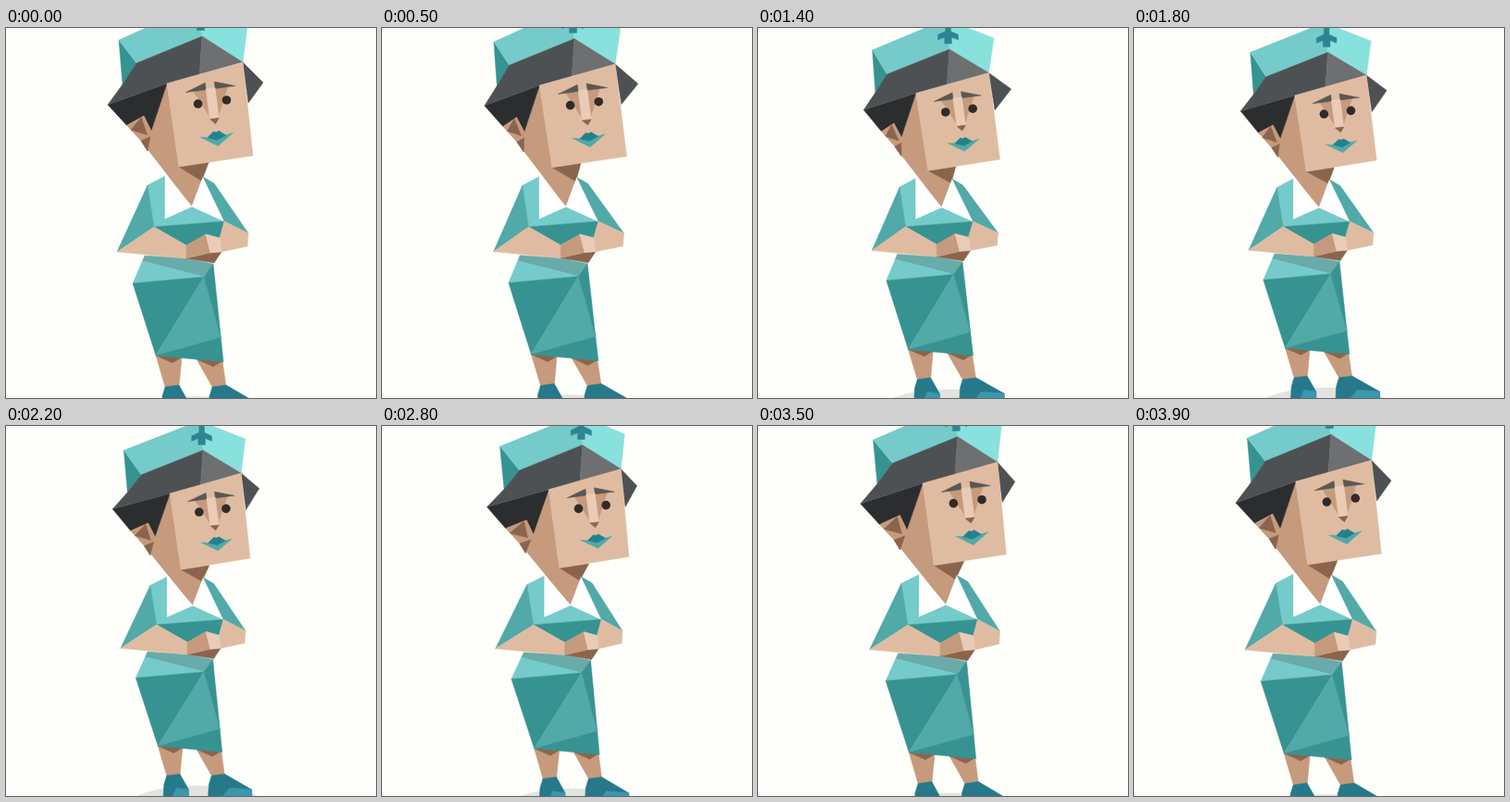
An HTML page that plays this animation: 400x400 px, repeating every 4 s.

```html
<!DOCTYPE html>
<html lang="en">
<head>
<meta charset="utf-8">
<title>Nurse</title>
<style>
  html, body { margin: 0; width: 100%; height: 100%; overflow: hidden; background: #fefffa; }
  svg { display: block; width: 100%; height: 100%; }
</style>
</head>
<body>
<svg id="stage" viewBox="0 0 400 400"></svg>
<script>
const LOOP = 4000, STEP = 100;
const C = {
  light: '#74cbc9', bright: '#88e1dc', mid: '#51a9a8', dark: '#369392', band: '#68abaa',
  shoe: '#26798a', sole: '#3a98ae', cross: '#2f8494', lip: '#24808d',
  skin: '#dfbca1', pale: '#e9cbb6', tan: '#c69a7c', brown: '#8b644d',
  hair: '#4e5153', sheen: '#6d6f70', black: '#2c2d2e', brow: '#5b5753', eye: '#302b2a', white: '#ffffff'
};

const mix = ([x, y], [X, Y], t) => [x + (X - x) * t, y + (Y - y) * t];

// Key points of the facets in the rest pose.
const P = {
  tip: [110, 83], nape: [126, 61], hatBack: [122, 13], fold: [141, 38], peak: [208, -26],
  apex: [212, 9], hatFront: [261, -2], brim: [256, 37], temple: [174, 60], jaw: [187, 150],
  chin: [267, 138], bun: [278, 59], curl: [262, 81],
  lobe: [146, 122], earTop: [149, 95], earIn: [157, 111], earLow: [153, 133],

  neck: [201, 193], collarL: [172, 160], collarR: [213, 161], flapL: [172, 206], flapR: [236, 209],
  shoulderL: [153, 170], shoulderR: [225, 168], elbowL: [120, 242], elbowR: [262, 222],
  cuff: [261, 236], armpit: [160, 215], wrist: [195, 235], palm: [195, 249], knuckle: [216, 223],
  thumb: [231, 227], nail: [233, 242], finger: [221, 243], under: [225, 254],

  waistL: [150, 246], hipL: [137, 276], waistR: [224, 255], buckle: [214, 269],
  hemL: [162, 354], hemR: [235, 361]
};
P.part = mix(P.temple, P.brim, .43);
P.throat = mix(P.jaw, P.chin, .4);
P.gullet = mix(P.neck, P.throat, .58);
P.earBack = mix(P.tip, P.lobe, .57);
P.sash = mix(P.waistL, P.hipL, .2);
P.knee = mix(P.waistR, P.hemR, .75);

const NS = 'http://www.w3.org/2000/svg';
const stage = document.getElementById('stage');
function add(tag, attrs) {
  const el = document.createElementNS(NS, tag);
  for (const k in attrs) el.setAttribute(k, attrs[k]);
  return stage.appendChild(el);
}

// How far a point follows the turn, the squeeze towards the middle and the bob.
function follow([x, y]) {
  if (y < 156) {
    const side = Math.min(1, (x - 108) / 30, (282 - x) / 30);
    const back = ((x - 110) * 110 - (y - 83) * 91) / 143;
    return [5.5 * Math.max(0, Math.min(side, back / 20)), (200 - x) * .06, (18.5 - .088 * y) * (.6 + .4 * side)];
  }
  const side = Math.max(0, Math.min(1, (x - 120) / 45, (262 - x) / 30));
  return [3 * side * Math.min(1, (500 - y) / 300), (200 - x) * .05, 3 - (y - 160) * .058];
}
function mover(p) {
  const [turn, squeeze, bob] = follow(p);
  return (h, v) => [p[0] + turn * h + squeeze * v, p[1] + bob * v];
}

const shapes = [];
function poly(colour, points) {
  const el = add('polygon', { fill: C[colour], stroke: C[colour], 'stroke-width': .5, 'stroke-linejoin': 'round' });
  shapes.push({ el, movers: points.map(mover) });
}
const facet = (colour, names) => poly(colour, names.split(' ').map(n => P[n]));

// Places (u, w) on axes that are tilted around a centre.
const axes = (cx, cy, tilt) => ([u, w]) => [
  cx + u * Math.cos(tilt) + w * Math.sin(tilt),
  cy - u * Math.sin(tilt) + w * Math.cos(tilt)
];
const flip = ([u, w]) => [-u, w];
const mirror = half => [...half, ...half.map(flip).reverse()];

function leg(x, y, ankle, toe) {
  const w = toe - ankle;
  poly('tan', [[x, y], [x + 28, y + 2], [ankle + 15, 388], [ankle, 388]]);
  poly('brown', [[x, y], [x + 28, y + 2], [x + 18, y + 8]]);
  poly('shoe', [[ankle, 388], [ankle + 15, 386], [toe, 404], [toe, 416], [ankle - 4, 416], [ankle - 3, 398]]);
  poly('sole', [[ankle + w * .45, 402], [toe, 404], [toe, 416], [ankle + w * .2, 416]]);
}

const ground = add('ellipse', { cx: 207, rx: 84, ry: 30, fill: '#e3e3df' });
leg(162, 354, 172, 197);
leg(206, 358, 223, 269);

facet('band', 'waistL palm waistR buckle sash');
facet('light', 'sash buckle hipL');
facet('dark', 'hipL buckle hemL');
facet('mid', 'buckle knee hemL');
facet('dark', 'buckle waistR knee');
facet('dark', 'hemL knee hemR');

facet('tan', 'temple earIn lobe neck collarR throat jaw');
facet('brown', 'jaw throat gullet');
facet('light', 'shoulderL collarL flapL armpit');
facet('mid', 'shoulderL armpit elbowL');
facet('light', 'armpit flapL neck flapR');
facet('dark', 'armpit flapR thumb knuckle wrist');
facet('white', 'collarL neck flapL');
facet('white', 'collarR neck flapR');
facet('mid', 'collarR shoulderR elbowR flapR');
facet('skin', 'elbowL armpit wrist palm');
facet('skin', 'flapR elbowR cuff nail thumb');
facet('brown', 'palm finger nail under');
facet('tan', 'wrist knuckle finger palm');
facet('pale', 'knuckle thumb nail finger');

facet('hair', 'brim bun curl');
facet('dark', 'hatBack nape fold');
facet('light', 'hatBack peak apex fold');
facet('bright', 'peak hatFront brim apex');
poly('cross', mirror([[3, -13], [3, -5], [11.5, -1], [11.5, 5], [4, 2], [4, 9.5]]).map(axes(210.5, -7, 0)));
facet('black', 'tip temple earIn earTop earBack');
facet('hair', 'tip nape fold apex part temple');
facet('sheen', 'apex brim part');
facet('tan', 'earBack earTop earIn earLow lobe');
poly('brown', [mix(P.earBack, P.lobe, .3), mix(P.earTop, P.earBack, .15), mix(P.earIn, P.lobe, .4)]);
poly('brown', [P.lobe, mix(P.earIn, P.earLow, .3), P.earLow]);
facet('skin', 'temple brim chin jaw');

const face = axes(223, 80, .13);
for (const side of [p => p, flip]) {
  const half = (colour, points) => poly(colour, points.map(p => face(side(p))));
  half('tan', [[5, -15], [19, -15], [5, 15]]);
  half('brow', [[5, -21.5], [27, -14], [5, -14]]);
}
poly('pale', mirror([[5, -15], [5, 18]]).map(face));
poly('brown', [[-5, 18], [5, 18], [.5, 24]].map(face));
poly('mid', mirror([[0, 41], [9, 37.5], [18, 36], [0, 48]]).map(face));
poly('lip', mirror([[0, 33], [3, 32], [10, 37.5], [0, 41.5]]).map(face));
const eyes = [-15.6, 15.6].map(u => ({
  el: add('circle', { r: 4.8, fill: C.eye }),
  at: mover(face([u, 0]))
}));

function draw(time) {
  const a = Math.floor(time % LOOP / STEP) * STEP / LOOP * 2 * Math.PI;
  const h = -Math.sin(a), v = (1 - Math.cos(a)) / 2;
  ground.setAttribute('cy', 428 - 9.5 * v);
  for (const { el, movers } of shapes) {
    el.setAttribute('points', movers.map(m => m(h, v).map(n => n.toFixed(2)).join()).join(' '));
  }
  for (const { el, at } of eyes) {
    const [x, y] = at(h, v);
    el.setAttribute('cx', x);
    el.setAttribute('cy', y);
  }
}
function tick() {
  draw(performance.now());
  requestAnimationFrame(tick);
}
tick();
</script>
</body>
</html>
```
